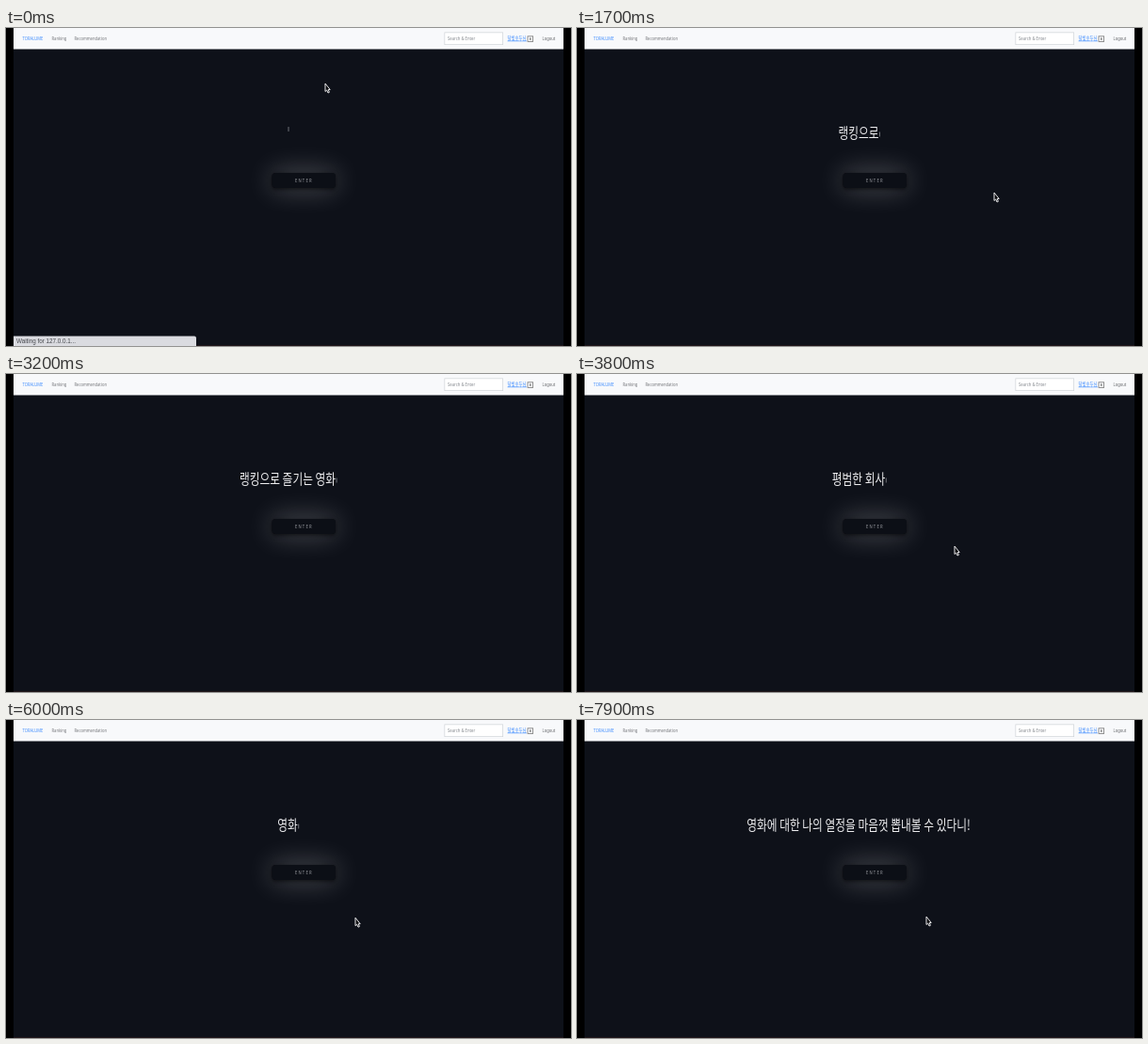
Write an HTML page with a canvas that moves like this. It is 600x338 px and loops after 8 s.

```html
<!DOCTYPE html>
<html lang="ko">
<head>
<meta charset="utf-8">
<style>
  html, body { margin: 0; width: 100%; height: 100%; overflow: hidden; background: #000; }
  canvas { display: block; }
</style>
</head>
<body>
<canvas id="stage" width="600" height="338"></canvas>
<script>
const ctx = document.getElementById('stage').getContext('2d');
const LOOP = 8000;
const CONDENSE = 0.78; // the whole page is set in one narrow cut
const PAGE_FONT = '"Noto Sans", "Noto Sans CJK KR", "Noto Sans CJK", sans-serif';
const HEADLINE_FONT = '500 15px "Noto Sans CJK KR", "Noto Sans CJK", sans-serif';

const phrases = [
  { text: '랭킹으로 즐기는 영화', start: 1420, speed: 65, erase: 3210 },
  { text: '평범한 회사원인 내가 알고보니 영화도사?!', start: 3400, speed: 65, erase: 5380 },
  { text: '영화에 대한 나의 열정을 마음껏 뽑내볼 수 있다니!', start: 5800, speed: 72, erase: LOOP }
];
const ERASE_SPEED = 15;

// time, x, y of the pointer tip
const pointerPath = [
  [0, 339, 59], [400, 352, 76], [1000, 425, 150], [1400, 444, 180], [1700, 443, 175],
  [2700, 442, 180], [3400, 405, 176], [3800, 401, 183], [4300, 300, 226],
  [5000, 198, 124], [5400, 320, 205], [5600, 371, 212], [6300, 371, 209], [LOOP, 371, 209]
];

function box(x, y, w, h, fill) {
  ctx.fillStyle = fill;
  ctx.fillRect(x, y, w, h);
}

function label(text, x, y, size, color, spacing = 0) {
  ctx.save();
  ctx.translate(x, y);
  ctx.scale(CONDENSE, 1);
  ctx.font = `${size}px ${PAGE_FONT}`;
  ctx.letterSpacing = `${spacing}px`;
  ctx.fillStyle = color;
  ctx.fillText(text, 0, 0);
  ctx.restore();
}

function drawNav() {
  box(8, 0, 584, 22.5, '#f8f9fb');
  label('TORALUME', 17.5, 13, 5.3, '#3f8cff');
  label('Ranking', 48.5, 13, 5.3, '#77797d');
  label('Recommendation', 72.5, 13, 5.3, '#77797d');
  box(465.5, 4.5, 62.5, 13.5, '#cfd3d8');
  box(466.2, 5.2, 61.1, 12.1, '#fff');
  label('Search & Enter', 469, 13, 5.4, '#85898e');
  label('달빛호두님', 532.5, 13, 5.6, '#3f8cff');
  box(532.5, 13.6, 20.5, 0.6, '#3f8cff');
  ctx.strokeStyle = '#777';
  ctx.lineWidth = 0.8;
  ctx.strokeRect(554, 8.8, 5.6, 5.6);
  box(556, 10.4, 1.6, 2.4, '#888');
  label('Logout', 569.5, 13, 5.3, '#66686c');
}

function drawButton() {
  const shape = new Path2D();
  shape.roundRect(282.5, 154, 67.5, 16, 4);
  ctx.save();
  ctx.fillStyle = '#0c0f16';
  ctx.shadowColor = 'rgba(255,255,255,.33)';
  ctx.shadowBlur = 29;
  ctx.fill(shape);
  ctx.shadowColor = 'rgba(0,0,0,.6)';
  ctx.shadowBlur = 4;
  ctx.shadowOffsetY = 1.5;
  ctx.fill(shape);
  ctx.restore();
  label('ENTER', 307, 164, 5.4, '#9b9da3', 1.5);
}

function typedLength(p, t) {
  const typed = Math.min(p.text.length, Math.floor((t - p.start) / p.speed));
  const erased = Math.max(0, Math.ceil((t - p.erase) / ERASE_SPEED));
  return Math.max(0, typed - erased);
}

function drawHeadline(t) {
  const phrase = phrases.find(p => typedLength(p, t) > 0);
  const count = phrase ? typedLength(phrase, t) : 0;
  const text = phrase ? phrase.text.slice(0, count) : '';
  const typing = phrase && count < phrase.text.length;
  ctx.font = HEADLINE_FONT;
  const width = ctx.measureText(text).width * CONDENSE;
  const left = 300 - (width + 2) / 2;
  ctx.save();
  ctx.translate(left, 117);
  ctx.scale(CONDENSE, 1);
  ctx.fillStyle = '#eeeef0';
  ctx.fillText(text, 0, 0);
  ctx.restore();
  if (typing || t % 800 < 400) box(left + width + 0.6, text ? 110.5 : 105, 0.8, 5, '#85878c');
}

function drawPointer(t) {
  if (t > 2850 && t < 3450) return;
  const i = pointerPath.findIndex(p => p[0] > t);
  const [t0, x0, y0] = pointerPath[i - 1];
  const [t1, x1, y1] = pointerPath[i];
  const k = (t - t0) / (t1 - t0);
  const e = k * k * (3 - 2 * k);
  ctx.save();
  ctx.translate(x0 + (x1 - x0) * e, y0 + (y1 - y0) * e);
  ctx.fillStyle = '#08090c';
  ctx.strokeStyle = '#e8e8ea';
  ctx.lineWidth = 1;
  const arrow = new Path2D('M0 0V8.5L1.7 7L3 10L4.4 9.3L3.2 6.5H5.2Z');
  ctx.fill(arrow);
  ctx.stroke(arrow);
  ctx.restore();
}

function drawStatus() {
  ctx.fillStyle = '#dadbe0';
  ctx.beginPath();
  ctx.roundRect(8, 327.5, 194, 12, [0, 2, 0, 0]);
  ctx.fill();
  ctx.font = '6.3px "Liberation Sans", Arial, sans-serif';
  ctx.fillStyle = '#45474c';
  ctx.fillText('Waiting for 127.0.0.1...', 11, 335);
}

function draw(now) {
  const t = now % LOOP;
  box(0, 0, 600, 338, '#000');
  box(8, 22, 584, 316, '#0e1119');
  box(8, 337, 584, 1, '#21161a');
  drawNav();
  drawButton();
  drawHeadline(t);
  if (t < 400) drawStatus();
  drawPointer(t);
  requestAnimationFrame(draw);
}
requestAnimationFrame(draw);
</script>
</body>
</html>
```
